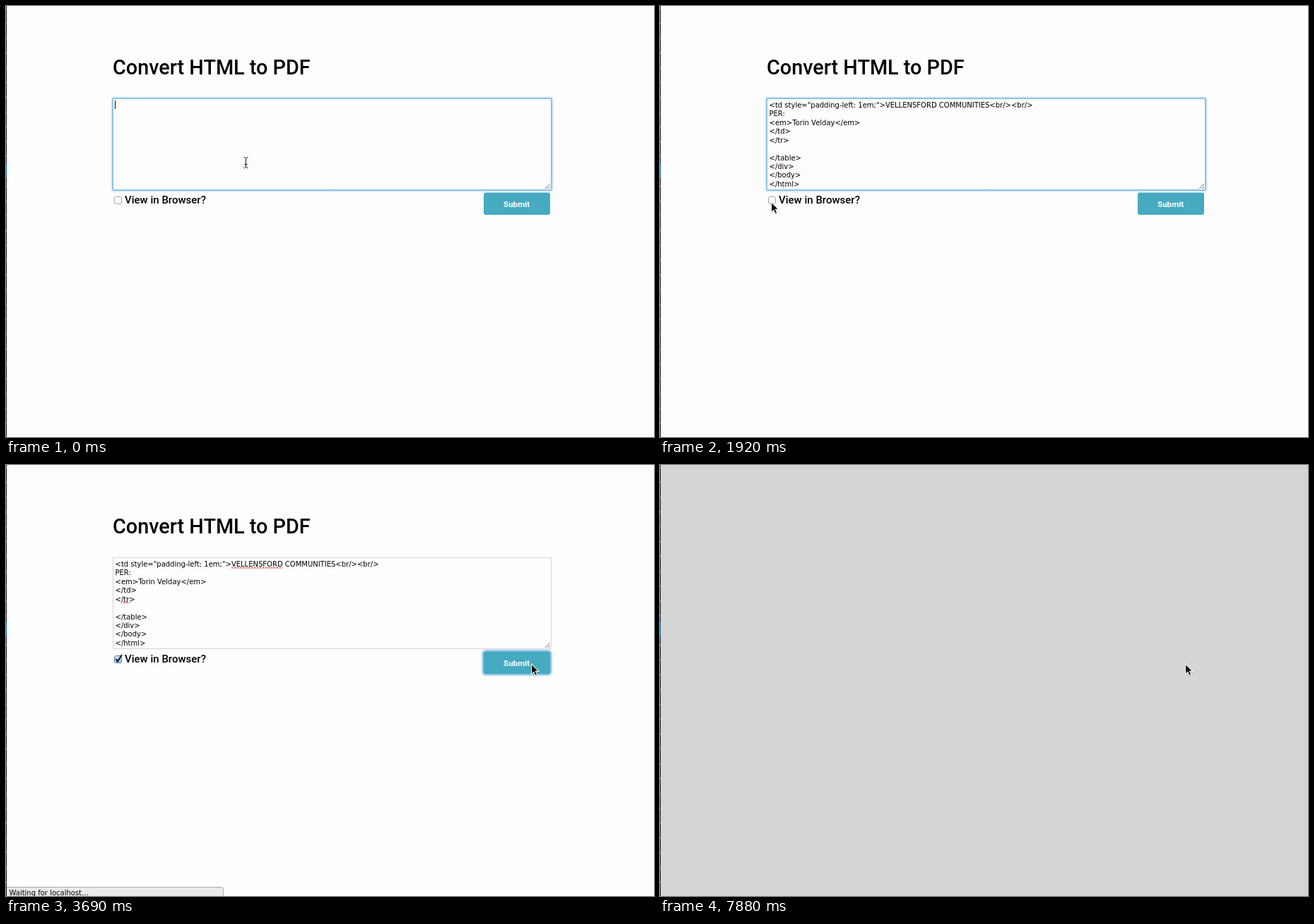
Recreate the animation shown at these times as an HTML page with a canvas. Size 917 px wide and 611 px high, loop 8 s.

```html
<!DOCTYPE html>
<html lang="en">
<head>
<meta charset="utf-8">
<title>Convert HTML to PDF</title>
<style>
  html, body { margin: 0; width: 100%; height: 100%; overflow: hidden; background: #fdfdfd; }
  canvas { display: block; }
</style>
</head>
<body>
<canvas id="stage" width="917" height="611"></canvas>
<script>
const ctx = document.getElementById('stage').getContext('2d');
const LOOP = 8000;
const UI_FONT = 'Roboto, sans-serif';
const TEXT_FONT = '10px "DejaVu Sans", sans-serif';
const PAGE = '#fdfdfd';

const COMPANY = 'VELLENSFORD';
const OPENING = '<td style="padding-left: 1em;">';
const LINES = [
  OPENING + COMPANY + ' COMMUNITIES<br/><br/>',
  'PER:',
  '<em>Torin Velday</em>',
  '</td>',
  '</tr>',
  '',
  '</table>',
  '</div>',
  '</body>',
  '</html>'
];

// start time, shape, x, y
const POINTER = [
  [0, drawBeam, 339, 222],
  [1340, drawBeam, 301, 254],
  [1480, drawBeam, 261, 267],
  [1630, drawArrow, 189, 286],
  [1780, drawBeam, 171, 283],
  [1920, drawArrow, 157, 277],
  [2070, drawArrow, 156, 277],
  [2360, drawBeam, 317, 288],
  [2500, drawArrow, 643, 292],
  [2650, drawArrow, 752, 292],
  [2800, drawArrow, 744, 282],
  [3390, drawArrow, 743, 281]
];

const during = (t, from, to) => t >= from && t < to;

function box(x, y, w, h, r, fill, stroke, lineWidth = 1) {
  ctx.beginPath();
  ctx.roundRect(x, y, w, h, r);
  if (fill) { ctx.fillStyle = fill; ctx.fill(); }
  if (stroke) { ctx.strokeStyle = stroke; ctx.lineWidth = lineWidth; ctx.stroke(); }
}

function rect(x, y, w, h, color) {
  ctx.fillStyle = color;
  ctx.fillRect(x, y, w, h);
}

function line(points, color, lineWidth = 1) {
  ctx.beginPath();
  points.forEach(([x, y]) => ctx.lineTo(x, y));
  ctx.strokeStyle = color;
  ctx.lineWidth = lineWidth;
  ctx.stroke();
}

function label(text, x, y, font, color = '#000') {
  ctx.font = font;
  ctx.fillStyle = color;
  ctx.fillText(text, x, y);
}

function drawBeam(x, y) {
  ctx.save();
  ctx.translate(x + 0.5, y);
  line([[-3, -7.5], [-1.5, -7.5], [0, -6], [0, 6], [-1.5, 7.5], [-3, 7.5]], '#111');
  line([[3, -7.5], [1.5, -7.5], [0, -6]], '#111');
  line([[3, 7.5], [1.5, 7.5], [0, 6]], '#111');
  line([[-2, 2.5], [2, 2.5]], '#111');
  ctx.restore();
}

function drawArrow(x, y) {
  ctx.save();
  ctx.translate(x + 0.5, y + 1);
  ctx.beginPath();
  [[0, 0], [0, 14.6], [3.4, 11.4], [5.6, 16.6], [8.2, 15.5], [6, 10.4], [10.4, 10.4]]
    .forEach(([px, py]) => ctx.lineTo(px, py));
  ctx.closePath();
  ctx.save();
  ctx.shadowColor = 'rgba(0,0,0,.35)';
  ctx.shadowBlur = 2;
  ctx.shadowOffsetY = 1;
  ctx.fillStyle = '#000';
  ctx.fill();
  ctx.restore();
  ctx.strokeStyle = '#fff';
  ctx.lineWidth = 1.1;
  ctx.stroke();
  ctx.restore();
}

function focusRing(x, y, w, h, r) {
  box(x, y, w, h, r, null, 'rgba(120,182,228,.28)', 6);
  box(x, y, w, h, r, null, 'rgba(120,182,228,.75)', 3);
}

function misspelled(x, y, width) {
  ctx.save();
  ctx.setLineDash([2.5, 1.5]);
  line([[x, y], [x + width, y]], '#e0402c', 1.6);
  ctx.restore();
}

function drawTextarea(t) {
  const focused = t < 2210;
  if (focused) focusRing(151.5, 131.5, 620, 129, 1.5);
  box(151.5, 131.5, 620, 129, 0, PAGE, focused ? '#8fc1e6' : '#d6d6d6');
  line([[763, 259], [770, 252]], '#777');
  line([[767, 259], [770, 256]], '#777');

  if (t < 150) {
    rect(154, 134, 1, 12, '#000');
    return;
  }
  LINES.forEach((text, i) => label(text, 154.5, Math.round(144 + i * 12.43), TEXT_FONT));
  if (t >= 2360) {
    const before = ctx.measureText(OPENING).width;
    misspelled(154.5 + before, 145.8, ctx.measureText(COMPANY).width);
    misspelled(166, 195.3, 9);
  }
  if (during(t, 150, 600) || during(t, 1040, 1630) || during(t, 2070, 2210)) {
    rect(200, 246, 1, 12, '#000');
  }
  if (t < 890) box(763, 221.5, 6, 22, 3, `rgba(0,0,0,${t < 750 ? 0.5 : 0.25})`);
}

function drawCheckbox(t) {
  const checked = t >= 2360;
  const pressed = during(t, 2210, 2360);
  const shade = ctx.createLinearGradient(0, 270, 0, 281);
  shade.addColorStop(0, checked ? '#d3e8fa' : pressed ? '#c8c8c8' : '#fff');
  shade.addColorStop(1, checked ? '#86bbec' : pressed ? '#dcdcdc' : '#f4f4f4');
  box(153.5, 270.5, 10, 10, 2, shade, checked ? '#5f7fa8' : '#a4a4a4');
  if (checked) line([[155.5, 275], [158, 278.5], [164, 269]], '#111', 2);
  label('View in Browser?', 168, 280, '500 15px ' + UI_FONT);
}

function drawButton(t) {
  if (t >= 3240) focusRing(675.5, 264, 95, 32.5, 4);
  box(676, 264.5, 94, 31.5, 3, '#46aac1');
  label('Submit', 704, 285, '700 11.6px ' + UI_FONT, '#fff');
}

function drawStatus(t) {
  if (!during(t, 3540, 7880)) return;
  ctx.save();
  ctx.globalAlpha = t < 3690 || t >= 7730 ? 0.5 : 1;
  box(0.5, 598.5, 307, 16, [0, 3, 0, 0], '#e9e9e9', '#adadad');
  label('Waiting for localhost...', 4.5, 610, TEXT_FONT);
  ctx.restore();
}

// One-pixel sliver of the window behind the page.
function drawEdge() {
  rect(0, 0, 1, 611, '#191b22');
  rect(0, 222, 1, 22, '#0b6ea8');
  for (let i = 0; i < 29; i++) {
    rect(0, 2 + i * 21, 1, 3, i % 3 ? '#4d5566' : '#6b6054');
  }
}

function draw(t) {
  rect(0, 0, 917, 611, t < 7430 ? PAGE : t < 7730 ? '#323232' : '#d5d5d5');
  if (t < 7430) {
    label('Convert HTML to PDF', 151, 97, '500 28.8px ' + UI_FONT);
    drawTextarea(t);
    drawCheckbox(t);
    drawButton(t);
  }
  drawStatus(t);
  drawEdge();
  const [, shape, x, y] = POINTER.findLast(([start]) => t >= start);
  shape(x, y);
}

const began = performance.now();
function tick() {
  draw((performance.now() - began) % LOOP);
  requestAnimationFrame(tick);
}
tick();
</script>
</body>
</html>
```
